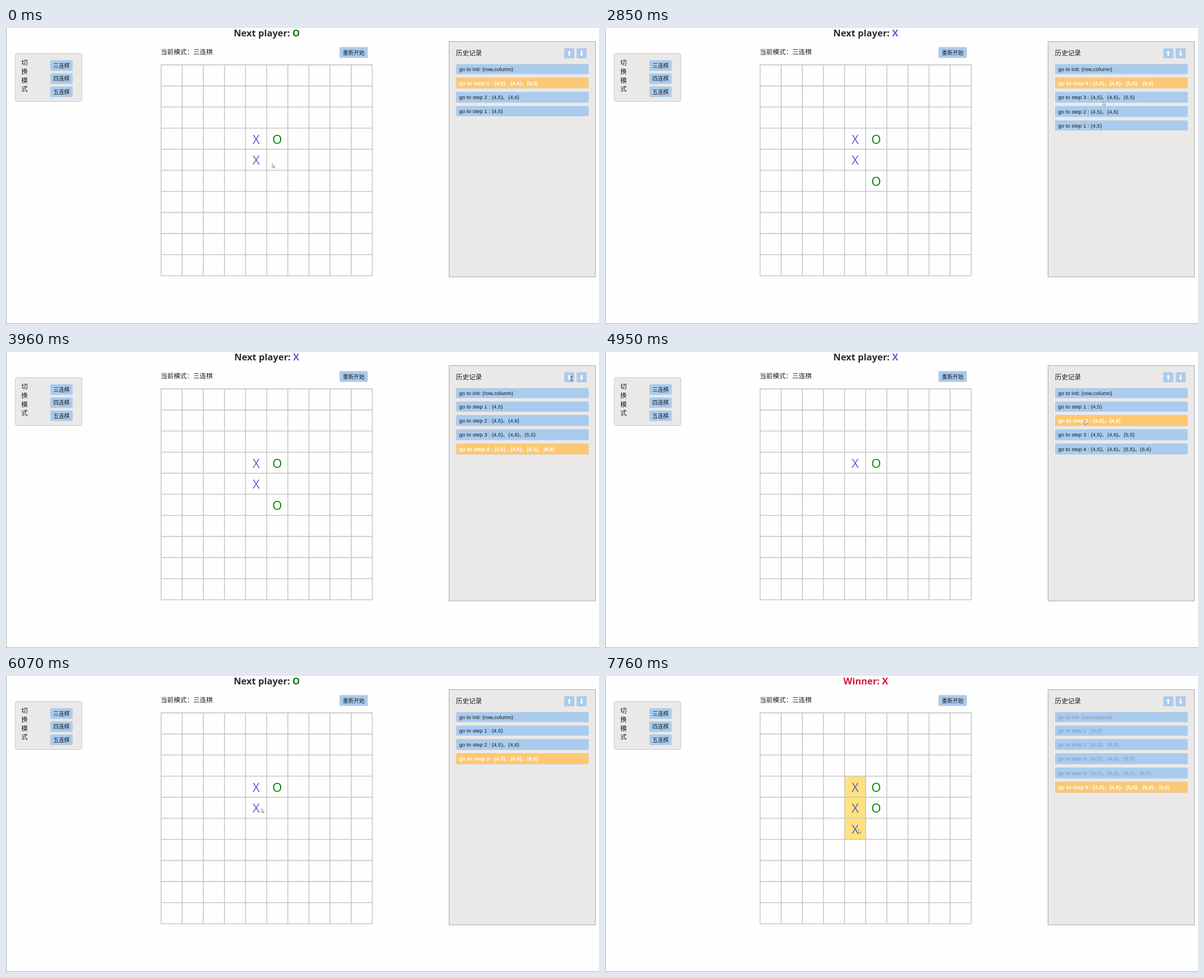
An HTML page for the animation above (8000 ms loop, 1058 by 529 pixels).

```html
<!DOCTYPE html>
<html lang="zh-CN">
<head>
<meta charset="utf-8">
<title>Connect game</title>
<style>
  html, body { margin: 0; width: 100%; height: 100%; overflow: hidden; background: #fefefe; }
  svg { display: block; width: 100%; height: 100%; }
  text { fill: #1a1a1a; }
  .zh { font-family: "Noto Sans CJK SC", "Noto Sans CJK JP", sans-serif; }
  .row { font: 9.6px "Liberation Sans", "Noto Sans CJK SC", sans-serif; }
  .on { font-weight: bold; fill: #fff; }
  .off { fill: #7f97b0; }
  .head { font: bold 16.5px "Open Sans", sans-serif; fill: #2c2c2c; text-anchor: middle; }
  .mark { font: 22px "Open Sans", sans-serif; text-anchor: middle; }
  .mid { text-anchor: middle; }
</style>
</head>
<body>
<svg viewBox="0 0 1058 529">
  <g id="page"></g>
  <g id="game"></g>
  <path id="arrow" d="M0 0V7L1.7 5.6 2.8 8 3.9 7.5 2.9 5.3 4.8 5.1Z" fill="#fff" stroke="#666" stroke-width=".7"/>
  <path id="beam" d="M-2-4H2M0-4V4M-2 4H2" fill="none" stroke="#555" stroke-width="1"/>
</svg>
<script>
const LOOP = 8000, BLUE = '#a9cbee', PANEL = '#ebe9e8';
const X0 = 276.7, Y0 = 65.9, CELL = 37.68;
const INK = { X: '#6a5acd', O: '#008000' };
const $ = id => document.getElementById(id);

const rect = (x, y, w, h, fill, extra = '') =>
  `<rect x="${x}" y="${y}" width="${w}" height="${h}" fill="${fill}" ${extra}/>`;
const text = (x, y, s, cls, extra = '') =>
  `<text x="${x}" y="${y}" class="${cls}" ${extra}>${s}</text>`;
const zh = (x, y, s, size, cls = '') => text(x, y, s, 'zh ' + cls, `font-size="${size}"`);
const button = (x, y, w, h, fill = BLUE) =>
  rect(x + .25, y + .25, w - .5, h - .5, fill, 'rx="1.5" stroke="#b9cbdc" stroke-width=".5"');

function drawPage() {
  let s = rect(0, 0, 1, 529, '#aaa') + rect(0, 528, 1058, 1, '#aaa');

  s += rect(16.5, 45.5, 119, 86, PANEL, 'rx="3" stroke="#ccc"');
  [...'切换模式'].forEach((c, i) => s += zh(33, 66.3 + i * 15.6, c, 11.52, 'mid'));
  [...'三四五'].forEach((c, i) => {
    s += button(79, 57.6 + i * 23.4, 40, 19) + zh(99, 70.9 + i * 23.4, c + '连棋', 9.7, 'mid');
  });

  s += zh(276, 46.7, '当前模式：三连棋', 11.6);
  s += button(595, 34, 50.5, 19.4) + zh(620.3, 47.5, '重新开始', 9.7, 'mid');

  s += rect(790.5, 24.3, 261, 420.6, PANEL, 'stroke="#a6a6a6"');
  s += zh(802.8, 49.2, '历史记录', 11.6);
  [996, 1018].forEach((x, i) => {
    s += button(x, 36, 18, 18.3);
    s += `<path transform="translate(${x + 9} 45.2) scale(1 ${i ? -1 : 1})"
      d="M0-5L3.2-1H1.3V4.5H-1.3V-1H-3.2Z" fill="#fff"/>`;
  });
  $('page').innerHTML = s;
}

function drawGrid() {
  let d = '';
  for (let i = 0; i <= 10; i++)
    d += `M${X0 + i * CELL} ${Y0 - .8}v${CELL * 10 + 1.6}M${X0 - .8} ${Y0 + i * CELL}h${CELL * 10 + 1.6}`;
  return `<path d="${d}" stroke="#c8c8c8" stroke-width="1.6" fill="none"/>`;
}

// Moves are row and column digits; step is the selected history entry.
const first = ['45', '46', '55', '66'], second = ['45', '46', '55', '56', '65'];
const phases = [
  { at: 0, moves: first.slice(0, 3), step: 3, desc: true },
  { at: 910, moves: first, step: 4, desc: true },
  { at: 3960, moves: first, step: 4 },
  { at: 4950, moves: first, step: 2 },
  { at: 5930, moves: second.slice(0, 3), step: 3 },
  { at: 6640, moves: second.slice(0, 4), step: 4 },
  { at: 7760, moves: second, step: 5, won: true }
];

function drawHistory({ moves, step, desc, won }) {
  const order = moves.map((_, i) => i + 1);
  if (desc) order.reverse();
  let y = 64.4, s = '';
  for (const n of [0, ...order]) {
    const h = n > 1 ? 19.6 : 18.2, on = n === step;
    const path = moves.slice(0, n).map(m => `(${m[0]},${m[1]})`).join('、');
    const label = n ? `go to step ${n} : ${path}` : 'go to init: (row,column)';
    s += button(803, y, 236.7, h, on ? '#fdc873' : BLUE);
    s += text(808.5, y + h / 2 + 3.4, label, 'row ' + (on ? 'on' : won ? 'off' : ''));
    y += h + 5.9;
  }
  return s;
}

function drawGame(p) {
  const next = p.step % 2 ? 'O' : 'X';
  let s = p.won
    ? text(465.2, 14.9, 'Winner: X', 'head', 'style="fill:#dc143c"')
    : text(465.2, 14.9, `Next player: <tspan fill="${INK[next]}">${next}</tspan>`, 'head');
  if (p.won) s += rect(X0 + 4 * CELL, Y0 + 3 * CELL, CELL, CELL * 3, '#ffe27d');
  s += drawGrid();
  p.moves.slice(0, p.step).forEach((m, i) => {
    const who = i % 2 ? 'O' : 'X';
    s += text(X0 + (m[1] - .5) * CELL, Y0 + (m[0] - .5) * CELL + 9, who, 'mark',
      `style="fill:${INK[who]}"`);
  });
  $('game').innerHTML = s + drawHistory(p);
}

// Pointer legs: first step, last step, step count, end point.
const start = [475, 242.5];
const legs = [
  [150, 510, 4, 475, 269],
  [1340, 1610, 3, 490, 247.5],
  [1890, 1890, 1, 490, 245],
  [2420, 2850, 4, 888.5, 131.5],
  [2970, 3370, 4, 1006, 57.5],
  [3520, 3670, 2, 1009, 47.5],
  [4110, 4950, 7, 855, 122.5],
  [5380, 5800, 4, 453, 236],
  [6070, 6070, 1, 456, 237],
  [6220, 6340, 2, 480, 237],
  [6780, 7210, 4, 452.5, 274]
];

function pointer(t) {
  let [x, y] = start;
  for (const [t0, t1, n, ex, ey] of legs) {
    if (t < t0) break;
    const gap = n > 1 ? (t1 - t0) / (n - 1) : 1;
    const k = Math.min(n, Math.floor((t - t0) / gap + .001) + 1) / n;
    const e = k * (2 - k);
    x += (ex - x) * e;
    y += (ey - y) * e;
  }
  return [x, y];
}

let shown = null;
function update(t) {
  const phase = phases.filter(p => p.at <= t).pop();
  if (phase !== shown) drawGame(shown = phase);
  const move = `translate(${pointer(t).join(' ')})`, overText = t >= 3520 && t < 4110;
  $('arrow').setAttribute('transform', move);
  $('beam').setAttribute('transform', move);
  $('arrow').setAttribute('visibility', overText ? 'hidden' : 'visible');
  $('beam').setAttribute('visibility', overText ? 'visible' : 'hidden');
}

drawPage();
update(0);
const begin = performance.now();
(function tick() {
  update((performance.now() - begin) % LOOP);
  requestAnimationFrame(tick);
})();
</script>
</body>
</html>
```
